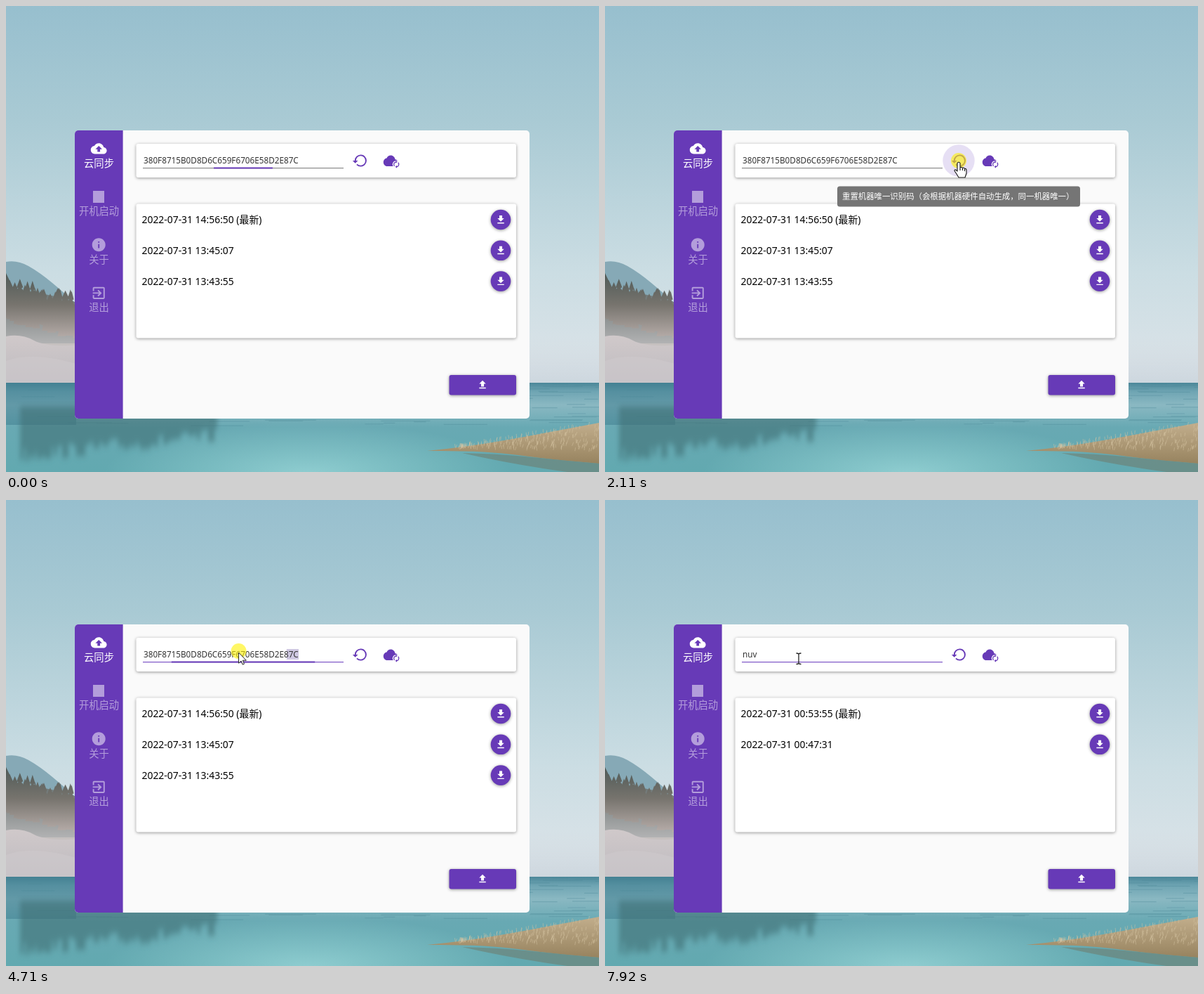
Animation of 845x663 px, one loop 7990 ms. Source, as an HTML page:

```html
<!DOCTYPE html>
<html lang="zh">
<head>
<meta charset="utf-8">
<style>
html, body { margin: 0; width: 100%; height: 100%; overflow: hidden; }
svg { display: block; }
text { font-family: "Noto Sans", "Noto Sans CJK SC", "Noto Sans CJK", sans-serif; }
.card { filter: drop-shadow(0 1px 2px #0006); fill: #fff; }
.nav { font-size: 14.3px; text-anchor: middle; fill: #fff; }
.dim { opacity: .5; }
.tip { font-size: 11.4px; fill: #fff; }
.row { font-size: 13.9px; fill: #000; }
</style>
</head>
<body>
<svg width="845" height="663" viewBox="0 0 845 663">
  <defs>
    <linearGradient id="sky" x2="0" y2="1">
      <stop stop-color="#97bfce"/><stop offset=".3" stop-color="#a9cad4"/>
      <stop offset=".7" stop-color="#cbdde3"/><stop offset="1" stop-color="#dde4e9"/>
    </linearGradient>
    <linearGradient id="water" x2="0" y2="1">
      <stop stop-color="#4b8799"/><stop offset=".1" stop-color="#6fa5b3"/>
      <stop offset=".25" stop-color="#8ab8c2"/><stop offset=".5" stop-color="#68a9b3"/>
      <stop offset="1" stop-color="#62a9b0"/>
    </linearGradient>
    <radialGradient id="glow">
      <stop stop-color="#9ad6d8" stop-opacity=".8"/><stop offset="1" stop-color="#9ad6d8" stop-opacity="0"/>
    </radialGradient>
    <linearGradient id="mist" x2="0" y2="1">
      <stop stop-color="#d3dbe1" stop-opacity="0"/><stop offset="1" stop-color="#ccd6de"/>
    </linearGradient>
    <linearGradient id="forest" gradientUnits="userSpaceOnUse" x1="0" y1="380" x2="0" y2="480">
      <stop stop-color="#505a57"/><stop offset=".45" stop-color="#77746e"/><stop offset="1" stop-color="#c0b5b2"/>
    </linearGradient>
    <linearGradient id="snow" x2="0" y2="1">
      <stop stop-color="#d0c9ca"/><stop offset="1" stop-color="#bdbabf"/>
    </linearGradient>
    <linearGradient id="grass" x2="0" y2="1">
      <stop stop-color="#c2ae8c"/><stop offset="1" stop-color="#97835f"/>
    </linearGradient>
    <filter id="soft"><feGaussianBlur stdDeviation="3 5"/></filter>
    <path id="down" d="M19 9h-4V3H9v6H5l7 7 7-7zM5 18v2h14v-2H5z"/>
    <path id="cloud" d="M19.35 10.04C18.67 6.59 15.64 4 12 4 9.11 4 6.6 5.64 5.35 8.04 2.34 8.36 0 10.91 0 14c0 3.31 2.69 6 6 6h13c2.76 0 5-2.24 5-5 0-2.64-2.05-4.78-4.65-4.96z"/>
  </defs>

  <rect width="845" height="540" fill="url(#sky)"/>
  <path d="M0 364Q16 361 32 370T66 394 110 432V480H0Z" fill="#86a9b6"/>
  <path d="M0 410Q40 400 110 425V490H0Z" fill="url(#forest)" opacity=".75"/>
  <path id="trees" fill="url(#forest)"/>
  <path d="M0 470Q22 466 40 476T110 482V540H0Z" fill="url(#snow)"/>
  <path d="M0 505Q40 490 110 512V540H0Z" fill="#cfcace" opacity=".6"/>
  <rect x="740" y="470" width="105" height="68" fill="url(#mist)"/>
  <rect y="536" width="845" height="127" fill="url(#water)"/>
  <rect y="536" width="100" height="60" fill="#3d7c8d" opacity=".5"/>
  <ellipse cx="430" cy="665" rx="290" ry="72" fill="url(#glow)"/>
  <path id="streaks" fill="none" stroke="#4b8796" stroke-width="1.2" opacity=".35"/>
  <path id="reflection" fill="#3f7075" opacity=".6" filter="url(#soft)"/>
  <path d="M600 633Q660 627 710 618T845 593V651Q780 646 730 639T600 633Z" fill="url(#grass)"/>
  <path d="M650 636Q700 637 740 641T845 651V663H800Q720 652 650 636Z" fill="#6f7f72" opacity=".6"/>
  <path id="blades" fill="none" stroke="#d6c4a2" stroke-width=".8" opacity=".6"/>

  <rect x="98" y="177" width="648" height="410" rx="5" fill="#fafafa"/>
  <path d="M166.6 177H103a5 5 0 0 0-5 5V582a5 5 0 0 0 5 5H166.6Z" fill="#673ab7"/>
  <g fill="#fff">
    <g transform="translate(120.8 191.4) scale(.95)">
      <use href="#cloud"/><path d="M14 13v4h-4v-4H7l5-5 5 5z" fill="#673ab7"/>
    </g>
    <g class="dim">
      <rect x="124" y="263" width="16" height="17"/>
      <path transform="translate(120.8 328.3) scale(.95)" d="M12 2C6.48 2 2 6.48 2 12s4.48 10 10 10 10-4.48 10-10S17.52 2 12 2zm1 15h-2v-6h2v6zm0-8h-2V7h2v2z"/>
      <path transform="translate(120.8 397) scale(.95)" d="M10.09 15.59L11.5 17l5-5-5-5-1.41 1.41L12.67 11H3v2h9.67l-2.58 2.59zM19 3H5c-1.11 0-2 .9-2 2v4h2V5h14v14H5v-4H3v4c0 1.1.89 2 2 2h14c1.1 0 2-.9 2-2V5c0-1.1-.9-2-2-2z"/>
    </g>
  </g>
  <text class="nav" x="132.5" y="228.5">云同步</text>
  <g class="dim">
    <text class="nav" x="132.5" y="297.3">开机启动</text>
    <text class="nav" x="132.5" y="365.8">关于</text>
    <text class="nav" x="132.5" y="434.3">退出</text>
  </g>

  <rect class="card" x="185.5" y="196" width="541.5" height="48" rx="3"/>
  <rect class="card" x="185.5" y="281.5" width="541.5" height="191" rx="3"/>
  <rect id="rowHover" x="185.5" width="541.5" height="44" fill="#000"/>

  <rect id="selection" y="212" height="15" fill="#cfc8e2"/>
  <text id="field" x="196" y="224" font-size="11.73" fill="#333"></text>
  <rect id="thin" x="195" y="230" width="286" height="1.2"/>
  <rect id="thick" y="229.5" height="2" fill="#673ab7"/>

  <g fill="#673ab7">
    <circle id="haloReset" cx="504" cy="220" r="22.7"/>
    <circle id="haloSync" cx="549.7" cy="220" r="22.7"/>
    <path transform="translate(493 208.6) scale(.95)" d="M13 3a9 9 0 0 0-9 9H1l3.89 3.89.07.14L9 12H6a7 7 0 1 1 7 7c-1.93 0-3.68-.79-4.94-2.06l-1.42 1.42A8.95 8.95 0 0 0 13 21a9 9 0 0 0 0-18z"/>
    <use href="#cloud" transform="translate(537.8 208.6) scale(.87 .97)"/>
    <circle cx="556.2" cy="225.3" r="5.4" fill="#fff"/>
    <path d="M553.6 227.8A3.6 3.6 0 0 1 555.6 221.8M558.8 222.8A3.6 3.6 0 0 1 556.8 228.8" fill="none" stroke="#673ab7" stroke-width="1.3"/>
    <path d="M555.4 219.8v4l2.3-2zM557 226.8v4l-2.3-2z"/>
  </g>

  <g id="rows"></g>
  <rect class="card" x="631.5" y="525" width="95.5" height="28.5" rx="3" style="fill:#673ab7"/>
  <path transform="translate(671 530.8) scale(.67)" d="M9 16h6v-6h4l-7-7-7 7h4zm-4 2h14v2H5z" fill="#fff"/>

  <g id="tipReset">
    <rect x="331" y="256.5" width="346" height="29" rx="3.5" fill="#757575"/>
    <text class="tip" x="338" y="275.3">重置机器唯一识别码（会根据机器硬件自动生成，同一机器唯一）</text>
  </g>
  <g id="tipSync">
    <rect x="513" y="256.5" width="73" height="29" rx="3.5" fill="#757575"/>
    <text class="tip" x="521" y="275.3">更新识别码</text>
  </g>

  <circle id="press" r="11" fill="#fff200" opacity=".6"/>
  <g id="cursor" stroke="#222" stroke-linejoin="round">
    <path id="arrow" fill="#fff" d="M0 0V15.2L3.5 12 5.7 17.2 7.9 16.2 5.8 11.2H10.8Z"/>
    <path id="hand" fill="#fff" stroke-width="1.2" d="M-2 1.5Q0-1 2 1.5V8Q4 6.5 5.5 8.5 7.5 7.5 8.5 9.5 10.5 9 11 11V16Q10.5 18 9 22H0L-3 17-6 12.5Q-6 10-3.5 11.5L-2 13ZM2 8V12M5.5 9V12M8.5 10V13"/>
    <path id="beam" fill="none" stroke-width="1.3" d="M-3.5 1Q-1 1 0 2 1 1 3.5 1M0 2V15.5M-3.5 16.5Q-1 16.5 0 15.5 1 16.5 3.5 16.5"/>
  </g>
</svg>
<script>
const LOOP = 7990;
const CODE = '380F8715B0D8D6C659F6706E58D2E87C';
const NEW_CODE = 'nuv';
const OLD_DATES = ['14:56:50 (最新)', '13:45:07', '13:43:55'];
const NEW_DATES = ['00:53:55 (最新)', '00:47:31'];
const $ = id => document.getElementById(id);
const set = (id, attrs) => { for (const k in attrs) $(id).setAttribute(k, attrs[k]); };
const ramp = (t, from, to) => Math.min(1, Math.max(0, (t - from) / (to - from)));
const ease = p => p * p * (3 - 2 * p);
const pulse = (t, inAt, outAt, fade) => ramp(t, inAt, inAt + fade) - ramp(t, outAt, outAt + fade);
const within = (t, a, b) => t >= a && t < b;

// Scenery
let seed = 7;
const rand = () => (seed = seed * 16807 % 2147483647) / 2147483647;
const repeat = (n, make) => Array.from({ length: n }, (_, i) => make(i)).join('');
set('trees', { d: repeat(60, i => {
  const x = i * 1.8, top = 380 + i * .45 + rand() * 26, w = 3 + rand() * 3;
  return `M${x} ${top}l${w} 12 -2 1 4 14 -3 1 3 16h${-2 * w - 4}l3 -16 -3 -1 4 -14 -2 -1Z`;
}) });
set('streaks', { d: repeat(80, () => `M${rand() * 845} ${538 + rand() * 60}h${15 + rand() * 60}`) });
set('reflection', { d: repeat(70, i => `M${20 + i * 4} 570h5v${(58 - i * .4) + rand() * 22}h-5Z`) });
set('blades', { d: repeat(260, () => {
  const x = 640 + rand() * 205, top = 631 - (x - 620) * .165;
  return `M${x} ${top + rand() * (x - 620) * .18}l${rand() * 3 - 1} -5`;
}) });

function rowsMarkup(times) {
  return times.map((time, i) => {
    const y = 304 + i * 43.8;
    return `<text class="row" x="193.5" y="${y + 5}">2022-07-31 ${time}</text>
      <circle class="card" cx="705" cy="${y}" r="14.3" style="fill:#673ab7"/>
      <use href="#down" fill="#fff" transform="translate(697 ${y - 8}) scale(.67)"/>`;
  }).join('');
}

// Pointer path: time, x, y
const PATH = [
  [70, 819, 628], [300, 819, 553], [600, 700, 340], [830, 605, 255], [1170, 504, 222],
  [2520, 504, 222], [2730, 559, 218], [3820, 559, 218], [4000, 545, 275], [4200, 465, 290],
  [4450, 416, 217], [4575, 416, 217], [4710, 332, 217], [5050, 182, 217], [6450, 182, 217],
  [6800, 538, 236], [6960, 555, 221], [7350, 555, 221], [7860, 276, 217], [LOOP, 276, 217]
];
function pointer(t) {
  const i = Math.max(1, PATH.findIndex(p => p[0] >= t));
  const [t0, x0, y0] = PATH[i - 1], [t1, x1, y1] = PATH[i];
  const p = ramp(t, t0, t1);
  return [x0 + (x1 - x0) * p, y0 + (y1 - y0) * p];
}

let shownDates;
function draw(t) {
  const [x, y] = pointer(t);
  const onButton = within(t, 1120, 3860) || within(t, 6720, 7440);
  const kind = onButton ? 'hand' : t > 7640 || within(t, 6450, 6700) ? 'beam' : 'arrow';
  for (const id of ['arrow', 'hand', 'beam']) set(id, { visibility: id === kind ? 'visible' : 'hidden' });
  set('cursor', { transform: `translate(${x} ${y})`, opacity: t < 70 ? 0 : 1 });
  const pressed = within(t, 2100, 2260) || within(t, 3240, 3400) || within(t, 4480, 5050) || within(t, 7080, 7220);
  set('press', { cx: x, cy: y - 2, visibility: pressed ? 'visible' : 'hidden' });

  const row = Math.floor((y - 282) / 44);
  const overRow = t >= 70 && row >= 0 && row < 3 && x > 186 && x < 727;
  set('rowHover', { y: 282 + row * 44, opacity: overRow ? .1 : 0 });

  const typed = NEW_CODE.slice(0, t < 5510 ? 0 : t < 5790 ? 1 : t < 5920 ? 2 : 3);
  $('field').textContent = typed || CODE;
  const left = Math.max(196, pointer(t - 110)[0]);
  set('selection', { x: left, width: within(t, 4600, 5510) ? Math.max(0, 417 - left) : 0 });

  const focus = 1 - ease(ramp(t, -230, 130)) + ease(ramp(t, 4478, 4838)) - ease(ramp(t, 7100, 7460));
  set('thin', { fill: t < 4478 ? '#8a8a8a' : '#7d55c6' });
  set('thick', { x: 338 - 143 * focus, width: 286 * focus });

  set('haloReset', { opacity: .16 * (pulse(t, 1080, 2600, 120) + pulse(t, 6660, 6860, 120)) + .14 * pulse(t, 2130, 2400, 140) });
  set('haloSync', { opacity: .16 * (pulse(t, 2640, 3860, 120) + pulse(t, 6880, 7420, 120)) + .14 * (pulse(t, 3260, 3860, 200) + pulse(t, 7100, 7420, 150)) });
  set('tipReset', { opacity: pulse(t, 1430, 2130, 160) });
  set('tipSync', { opacity: pulse(t, 2930, 3430, 160) });

  const dates = t < 7360 ? OLD_DATES : NEW_DATES;
  if (dates !== shownDates) $('rows').innerHTML = rowsMarkup(shownDates = dates);
}
function tick() {
  draw(performance.now() % LOOP);
  requestAnimationFrame(tick);
}
tick();
</script>
</body>
</html>
```
